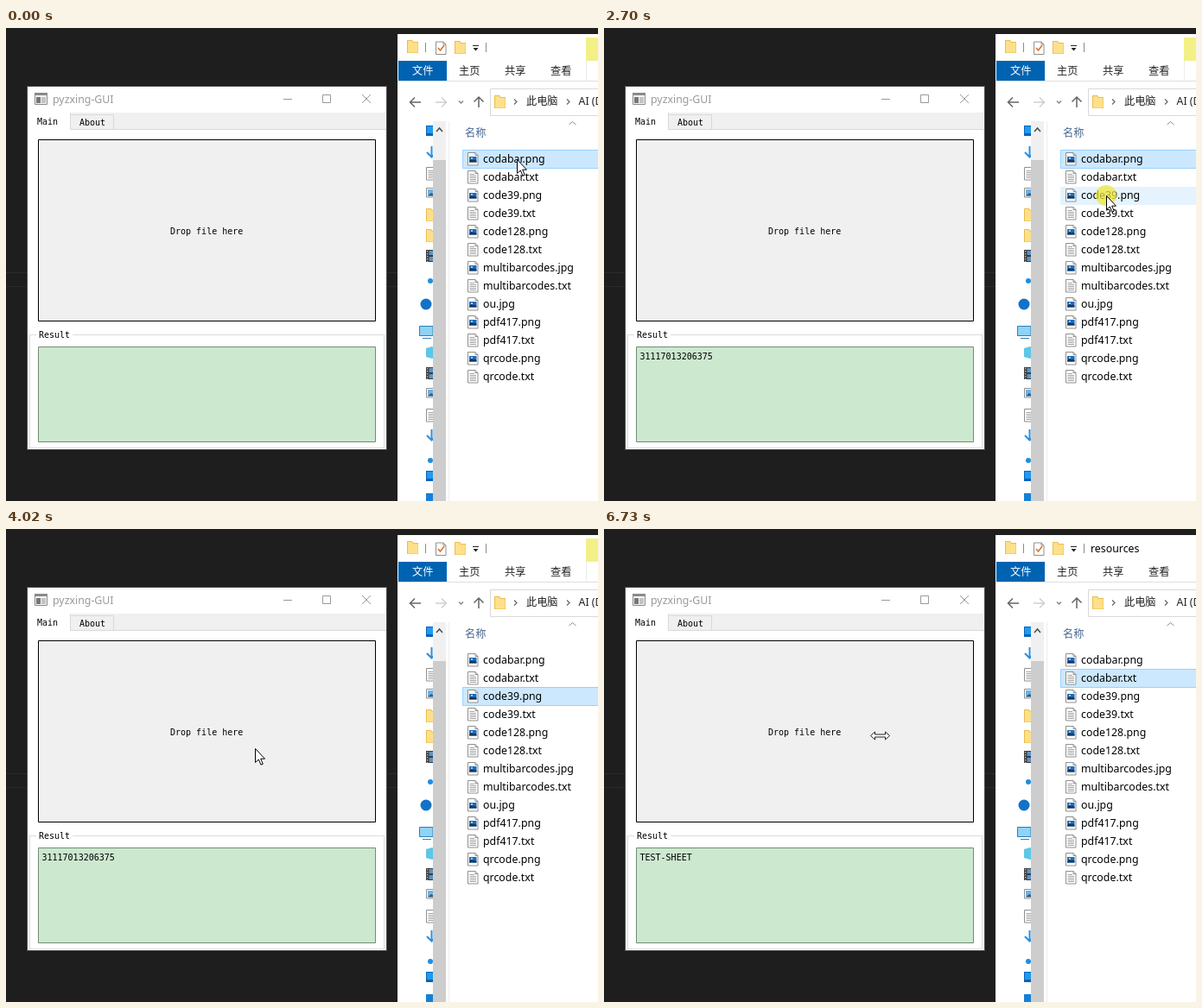
Recreate the animation shown at these times as an HTML page. Size 685 px wide and 548 px high, loop 7.89 s.

```html
<!DOCTYPE html>
<html lang="zh">
<head>
<meta charset="utf-8">
<title>pyzxing-GUI</title>
<style>
html, body { margin: 0; width: 100%; height: 100%; overflow: hidden; background: #1e1e1e; }
svg { display: block; }
text { font: 12.35px "Noto Sans", "Noto Sans CJK SC", sans-serif; white-space: pre; }
.cjk { font: 12.2px "Noto Sans CJK SC", "Noto Sans CJK", sans-serif; }
.mono { font: 10px "DejaVu Sans Mono", monospace; }
.line { fill: none; }
</style>
</head>
<body>
<svg width="685" height="548" viewBox="0 0 685 548">
  <defs>
    <linearGradient id="glass" x2="0" y2="1">
      <stop stop-color="#f1f9fd"/><stop offset="1" stop-color="#cee7f3"/>
    </linearGradient>
    <g id="folder">
      <path d="M0 0H6L7.500 2H13V15H0Z" fill="#e9bd4f"/>
      <path d="M1 1H5.500L7 3H12.500V14.500H1Z" fill="#ffe08a"/>
    </g>
    <g id="page">
      <path d="M.5 .5H9L12 3.500V15H.5Z" fill="#fff" stroke="#8f8f8f"/>
      <path class="line" d="M9 .5V3.500H12" stroke="#8f8f8f"/>
    </g>
    <g id="txt">
      <use href="#page"/>
      <path class="line" d="M2.500 4.500H8M2.500 6.500H10M2.500 8.500H10M2.500 10.500H10M2.500 12.500H10" stroke="#a3a3a3"/>
    </g>
    <g id="img">
      <use href="#page"/>
      <path d="M2 5H10.500V11.500H2Z" fill="#1c6cba"/>
      <path d="M2 11.500V10L5 8L7 9.500L8.500 8.500L10.500 10V11.500Z" fill="#17365c"/>
      <circle cx="5" cy="7" r="1" fill="#cfe8ff"/>
    </g>
    <g id="screen">
      <path d="M0 0H12V12H0Z" fill="#0a63b8"/><path d="M1 1H12V9H1Z" fill="#1f9bf0"/>
    </g>
    <path id="down" class="line" d="M6.500 0V12M1 7L6.500 12.500L12 7" stroke="#2c8fdd" stroke-width="2"/>
    <g id="film">
      <path d="M0 0H12V14H0Z" fill="#3c3c3c"/><path d="M3.500 1H12V6H3.500ZM3.500 8H12V13H3.500Z" fill="#5d93c4"/>
      <path class="line" d="M1.700 1V14" stroke="#ddd" stroke-dasharray="1.500 1.500"/>
    </g>
    <g id="pic">
      <path d="M.5 .5H13V11H.5Z" fill="#fff" stroke="#8c8c8c"/><path d="M2 2H12V9.500H2Z" fill="#6fb2e6"/>
      <path d="M2 9.500L6 6L9 8V9.500Z" fill="#355a78"/>
    </g>
    <circle id="dot" cx="5" cy="12" r="3" fill="#1f8ee0"/>
    <path id="cube" d="M0 2L7 0L14 3V12L7 14L0 12Z" fill="#5cc7e6"/>
    <path id="tile" d="M0 2H12V12H0Z" fill="#1580d8"/>
  </defs>

  <path class="line" d="M0 283.500H685M0 299.500H685" stroke="#2b2b2b"/>

  <g id="app">
    <path d="M24.500 67.500H440.500V488.500H24.500Z" fill="#fff" stroke="#484848"/>
    <path d="M33.500 75.500H47.500V88.500H33.500Z" fill="#f4f4f4" stroke="#8a8a8a"/>
    <path d="M33 75H48V78H33Z" fill="#8a8a8a"/>
    <path d="M35 80H40V87H35Z" fill="#777"/><path d="M41 80H46V87H41Z" fill="#c4c4c4"/>
    <text x="54" y="87" fill="#999">pyzxing-GUI</text>
    <path class="line" d="M321 82.500H331M366.500 77.500H375.500V86.500H366.500ZM412 77L422 87M422 77L412 87" stroke="#999"/>
    <path d="M25 98H440V118H25Z" fill="#f0f0f0"/>
    <path d="M25 98H74V118H25Z" fill="#fff"/>
    <path class="line" d="M74.500 98V117.500H440M74.500 100.500H124.500V117" stroke="#d9d9d9"/>
    <path d="M37.500 129.500H427.500V339.500H37.500Z" fill="#f0f0f0" stroke="#000"/>
    <path class="line" d="M35 355.500H27.500V486.500H437.500V355.500H77" stroke="#dcdcdc"/>
    <path d="M37.500 369.500H427.500V479.500H37.500Z" fill="#cce8cf" stroke="#728c76"/>
    <text class="mono" x="36" y="112">Main</text>
    <text class="mono" x="85" y="113">About</text>
    <text class="mono" x="190" y="239">Drop file here</text>
    <text class="mono" x="38" y="359">Result</text>
    <text class="mono" x="41.500" y="384" id="result"></text>
  </g>

  <g id="explorer">
    <path d="M453 7H685V548H453Z" fill="#fff"/>
    <use href="#folder" x="464" y="14"/>
    <use href="#page" x="497" y="15.500"/>
    <path class="line" d="M500 23L502.500 26L507 20" stroke="#d8752c" stroke-width="1.600"/>
    <use href="#folder" x="519" y="15"/>
    <path class="line" d="M485.500 17V28M555.500 17V28" stroke="#8a8a8a"/>
    <path d="M540 20H547V21H540ZM540.500 23H546.500L543.500 26.500Z" fill="#222"/>
    <g id="tools">
      <path d="M671 11H685V38H671Z" fill="#f3f087"/>
      <path class="line" d="M671.500 38V61" stroke="#ececec"/>
    </g>
    <text id="name" x="563" y="27">resources</text>
    <path class="line" d="M453 61.500H685" stroke="#dfdfdf"/>
    <path d="M454 38H510V61H454Z" fill="#0063b1"/>
    <g fill="#222">
      <text class="cjk" x="470" y="54" fill="#fff">文件</text>
      <text class="cjk" x="524" y="54">主页</text>
      <text class="cjk" x="577" y="54">共享</text>
      <text class="cjk" x="630" y="54">查看</text>
      <text class="cjk" x="602" y="89">此电脑</text>
      <text x="662.500" y="89">AI (D:)</text>
    </g>
    <g class="line" stroke="#666" stroke-width="1.500">
      <path d="M480 86H468M473 80.500L467.500 86L473 91.500"/>
      <path d="M497 86H509M504 80.500L509.500 86L504 91.500" stroke="#cfcfcf"/>
      <path d="M524 84.500L526.500 87L529 84.500" stroke="#888"/>
      <path d="M547 92V80M541.500 85.500L547 80L552.500 85.500"/>
      <path d="M588 82.500L591 85.500L588 88.500M649 82.500L652 85.500L649 88.500" stroke-width="1.200"/>
      <path d="M651.500 112L655.500 108.500L659.500 112" stroke="#888" stroke-width="1"/>
    </g>
    <path class="line" d="M690 70.500H560.500V101.500H690" stroke="#d9d9d9"/>
    <use href="#folder" x="565" y="78"/>
    <g id="nav"></g>
    <circle cx="486" cy="320" r="6.500" fill="#1272c8"/>
    <path d="M478.500 345.500H494V356.500H478.500Z" fill="#8fd3f7" stroke="#2e7fb5"/>
    <path d="M482 359H492V360H482Z" fill="#2e7fb5"/>
    <path d="M494 108H509V548H494Z" fill="#f0f0f0"/>
    <path d="M494 153H509V548H494Z" fill="#cdcdcd"/>
    <path class="line" d="M498 120L501.500 116L505 120" stroke="#505050" stroke-width="1.600"/>
    <path class="line" d="M512.500 108V548" stroke="#ededed"/>
    <text class="cjk" x="531" y="126" fill="#47678f">名称</text>
    <path id="hover" d="M528 142H690V163H528Z" fill="#e5f3ff"/>
    <path id="pick" d="M528.500 141.500H690V162.500H528.500Z" fill="#cce8ff" stroke="#99d1ff"/>
    <g id="files"></g>
  </g>

  <g id="thumb">
    <path d="M104 3H105.500V105.500H3V104H104Z" opacity=".25"/>
    <rect x=".5" y=".5" width="103" height="103" rx="1" fill="url(#glass)" stroke="#d3e6f0" opacity=".82"/>
    <rect id="strip" x="6" y="72" height="20" fill="#fff"/>
    <g id="sheet">
      <path d="M28.500 18.500H66L76 28.500V88.500H28.500Z" fill="#fff" stroke="#9a9a9a"/>
      <path class="line" d="M34 34.500H70M34 42.500H70M34 50.500H70M34 58.500H70M34 66.500H70M34 74.500H70" stroke="#a8a8a8"/>
    </g>
  </g>
  <g id="mouse">
    <circle id="press" r="12" fill="#eee736" opacity=".74"/>
    <path id="arrow" d="M.5 .5V16.500L4.300 13L7 19.200L9.300 18.200L6.700 12.200H11.500Z" fill="#fff" stroke="#000"/>
    <path id="resize" d="M-11 0L-6 -4.500V-1.500H6V-4.500L11 0L6 4.500V1.500H-6V4.500Z" fill="#fff" stroke="#222"/>
    <g id="deny" transform="translate(28.500 21.500)" fill="none" stroke="#8f2f2f" stroke-width="1.700">
      <circle r="5.500" fill="#fff" fill-opacity=".7"/><path d="M-4 -4L4 4"/>
    </g>
    <g id="copy" transform="translate(10 13)">
      <path d="M.5 .5H50.500V19.500H.5Z" fill="#fff" stroke="#777"/>
      <path class="line" d="M5 10H15M10 5V15" stroke="#1436c0" stroke-width="2"/>
      <text class="cjk" x="20" y="14.500" fill="#1436c0">复制</text>
    </g>
  </g>
</svg>
<script>
const LOOP = 7890;
const $ = id => document.getElementById(id);
const show = (id, on) => { $(id).style.display = on ? '' : 'none'; };
const place = (id, x, y) => $(id).setAttribute('transform', `translate(${x} ${y})`);

const files = ['codabar.png', 'codabar.txt', 'code39.png', 'code39.txt', 'code128.png', 'code128.txt',
  'multibarcodes.jpg', 'multibarcodes.txt', 'ou.jpg', 'pdf417.png', 'pdf417.txt', 'qrcode.png', 'qrcode.txt'];
$('files').innerHTML = files.map((f, i) => {
  const y = 21 * i;
  return `<use href="#${f.endsWith('txt') ? 'txt' : 'img'}" x="534" y="${144 + y}"/><text x="552" y="${156 + y}">${f}</text>`;
}).join('');

// Two groups of sidebar icons, 24px apart.
const sidebar = (top, ids) => ids.map((id, i) => `<use href="#${id}" x="486" y="${top + 24 * i}"/>`).join('');
$('nav').innerHTML =
  sidebar(113, ['screen', 'down', 'txt', 'pic', 'folder', 'folder', 'film', 'dot']) +
  sidebar(369, ['cube', 'film', 'pic', 'txt', 'down', 'dot', 'screen', 'tile']);

// Pointer moves: start time, step length, then one point per step.
const moves = [
  [0, 610, [[591, 152]]],
  [610, 76.5, [[590, 153], [562, 157], [492, 171], [428, 190], [385, 206], [362, 215], [354, 217]]],
  [1830, 80, [[354, 218], [358, 218], [376, 217], [414, 214], [466, 211], [520, 207], [553, 201], [570, 197], [579, 194], [581, 194]]],
  [2760, 77.8, [[581, 194], [575, 195], [556, 199], [519, 207], [468, 218], [417, 229], [373, 237], [337, 242], [305, 251], [289, 253], [288, 254]]],
  [5330, 77.5, [[310, 250], [380, 232], [470, 205], [536, 182], [562, 173]]],
  [5800, 75, [[562, 173], [556, 175], [512, 186], [440, 206], [378, 224], [335, 236], [320, 239]]],
];
const drags = [
  { press: 390, pick: 0, start: 610, drop: 1600, row: 0, strip: 78 },
  { press: 2700, pick: 2760, start: 2830, drop: 4020, row: 2, strip: 74 },
  { press: 5800, pick: 5870, start: 5870, drop: 6730, row: 1, strip: 0 },
];

function pointer(t) {
  const [t0, dt, pts] = moves.filter(m => m[0] <= t).pop();
  const k = Math.min(pts.length - 1, Math.floor((t - t0 + 6) / dt));
  const [x, y] = pts[k];
  return { x, y, dx: k ? x - pts[k - 1][0] : 0 };
}

function draw(t) {
  const { x, y, dx } = pointer(t);
  const drag = drags.find(d => t >= d.start && t < d.drop);
  const { row } = drags.filter(d => d.pick <= t).pop();
  const over = Math.floor((y - 142) / 21);
  const resize = (t >= 1600 && t < 1830) || t >= 6730;
  const accepts = drag && drag.strip && x < 438;

  place('pick', 0, 21 * row);
  show('hover', !drag && x > 528 && over !== row);
  place('hover', 0, 21 * over);
  show('tools', row !== 1);
  show('name', row === 1);
  $('result').textContent = t < 2300 ? '' : t < 5030 ? '31117013206375' : 'TEST-SHEET';

  show('thumb', drag);
  if (drag) {
    const lag = Math.max(0, -dx - 38) / 4;
    place('thumb', x - 52 + lag, y - 92 - lag / 4);
    $('strip').setAttribute('width', drag.strip);
    show('sheet', !drag.strip);
  }
  place('mouse', resize ? x - .5 : x, y + (resize ? .5 : 0));
  show('press', drags.some(d => t >= d.press && t < d.drop));
  show('arrow', !resize);
  show('resize', resize);
  show('copy', accepts);
  show('deny', drag && !accepts);
}

const born = performance.now();
function tick() {
  draw((performance.now() - born) % LOOP);
  requestAnimationFrame(tick);
}
tick();
</script>
</body>
</html>
```
